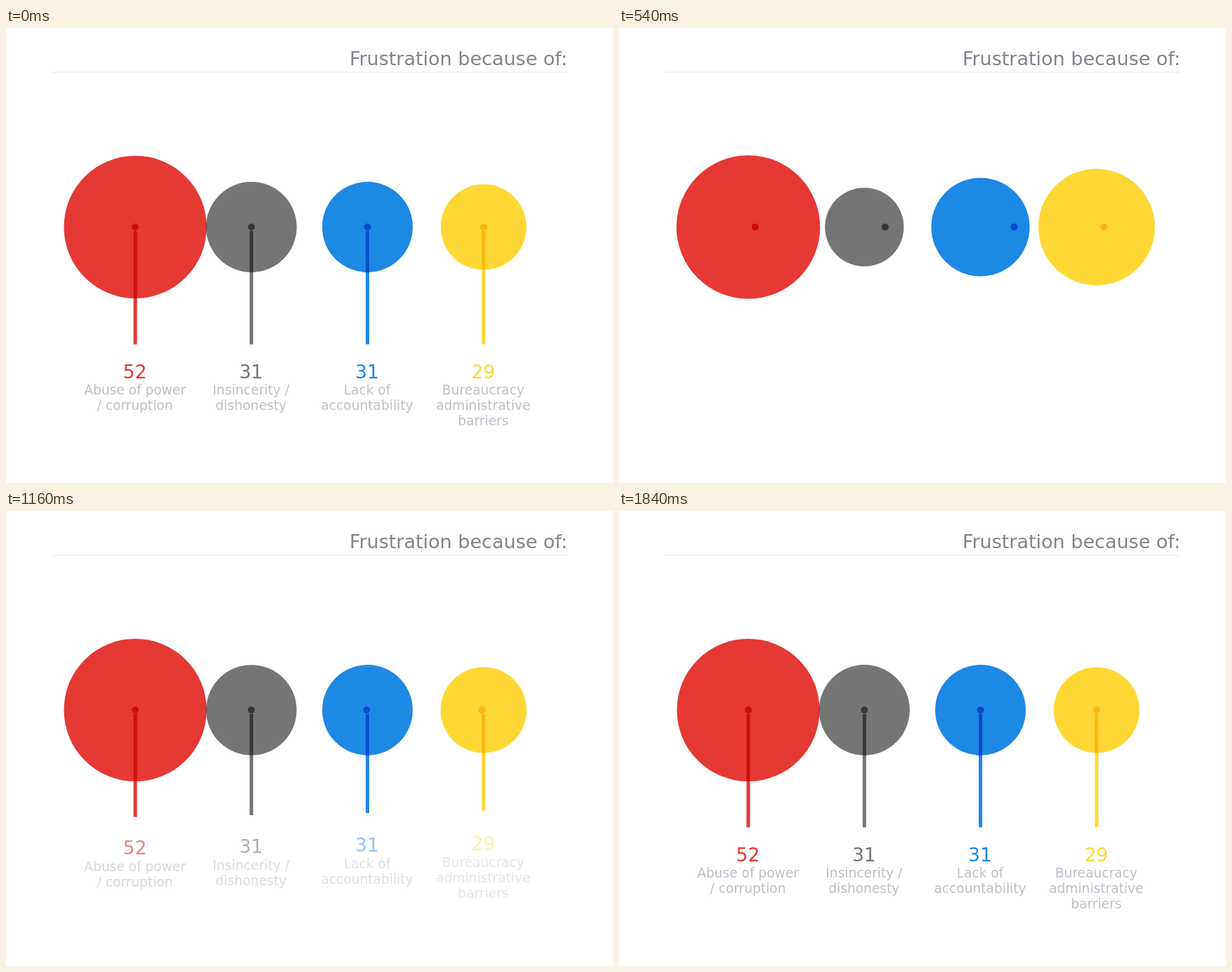
An HTML page that plays this animation: 864 px wide and 648 px high, repeating every 5980 ms.

```html
<!DOCTYPE html>
<html lang="en">
<head>
<meta charset="utf-8">
<title>Frustration because of</title>
<style>
  html, body { margin: 0; width: 100%; height: 100%; overflow: hidden; background: #fff; }
  svg { display: block; width: 100%; height: 100%; font-family: "DejaVu Sans", sans-serif; }
  .mark { mix-blend-mode: multiply; }
  .title { font-size: 27px; fill: #80848c; text-anchor: end; }
  .value { font-size: 26.6px; text-anchor: middle; }
  .label { font-size: 18.6px; fill: #bdc0c8; text-anchor: middle; }
</style>
</head>
<body>
<svg id="stage" viewBox="0 0 864 648">
  <rect width="864" height="648" fill="#fff"/>
  <text class="title" x="799" y="52.5">Frustration because of:</text>
  <rect x="65" y="62.5" width="734" height="1" fill="#e2e5e8"/>
</svg>
<script>
const LOOP = 5980, HOLD = 20;
const CY = 283.5, DOT_TRAVEL = 1.39;
const LINE_TOP = 289, LINE_LENGTH = 161.5, TEXT_RISE = 26;

// dot: start time; disc: start time and duration
const items = [
  { x: 184,   r: 101.6, color: '#e53935', value: 52, lines: ['Abuse of power', '/ corruption'],              dot: 72,  disc: [143, 1050] },
  { x: 349.3, r: 64.5,  color: '#757575', value: 31, lines: ['Insincerity /', 'dishonesty'],                 dot: 149, disc: [240, 1030] },
  { x: 514.5, r: 64.5,  color: '#1e88e5', value: 31, lines: ['Lack of', 'accountability'],                   dot: 224, disc: [342, 960] },
  { x: 679.8, r: 61,    color: '#fdd835', value: 29, lines: ['Bureaucracy', 'administrative', 'barriers'],   dot: 308, disc: [423, 960] }
];

const stage = document.getElementById('stage');

function add(parent, tag, attrs, text) {
  const el = document.createElementNS(stage.namespaceURI, tag);
  set(el, attrs);
  if (text !== undefined) el.textContent = text;
  return parent.appendChild(el);
}

function set(el, attrs) {
  for (const key in attrs) el.setAttribute(key, attrs[key]);
}

const progress = (time, start, duration) => Math.min(1, Math.max(0, (time - start) / duration));
const powerOut = (t, power) => 1 - (1 - t) ** power;
const elasticOut = (t, period) =>
  t <= 0 ? 0 : t >= 1 ? 1 : 1 - 2 ** (-10 * t) * Math.cos(2 * Math.PI * t / period);

for (const item of items) {
  const mark = { class: 'mark', fill: item.color };
  item.discEl = add(stage, 'circle', { ...mark, cx: item.x, cy: CY });
  item.dotEl = add(stage, 'circle', { ...mark, cy: CY, r: 5 });
  item.lineEl = add(stage, 'rect', { ...mark, x: item.x - 2.5, y: LINE_TOP, width: 5 });
  item.textEl = add(stage, 'g', {});
  const x = item.x - 0.5;
  add(item.textEl, 'text', { class: 'value', x, y: 498.7, fill: item.color }, item.value);
  item.lines.forEach((line, row) =>
    add(item.textEl, 'text', { class: 'label', x, y: 522.2 + 22 * row }, line));
}

function draw(time) {
  // the loop opens on the finished chart
  const now = time < HOLD ? LOOP : time;
  items.forEach((item, i) => {
    const grow = elasticOut(progress(now, ...item.disc), 0.3);
    const slide = elasticOut(progress(now, item.dot, 1000), 0.9);
    const drop = powerOut(progress(now, 695 + 25 * i, 1225), 5);
    const fade = powerOut(progress(now, 991 + 25 * i, 600), 3);
    set(item.discEl, { r: item.r * grow });
    set(item.dotEl, { cx: item.x * (1 + DOT_TRAVEL * (slide - 1)) });
    set(item.lineEl, { height: LINE_LENGTH * drop });
    set(item.textEl, { opacity: fade, transform: `translate(0 ${TEXT_RISE * (fade - 1)})` });
  });
}

const origin = performance.now();
function tick() {
  draw((performance.now() - origin) % LOOP);
  requestAnimationFrame(tick);
}
tick();
</script>
</body>
</html>
```
